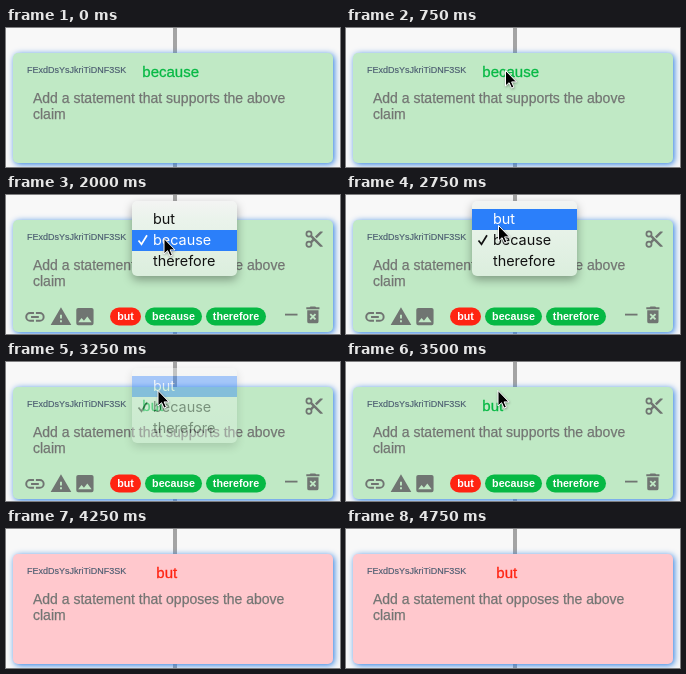
Write an HTML page that moves like this. It is 334x139 px and loops after 5.75 s.

```html
<!DOCTYPE html>
<html lang="en">
<head>
<meta charset="utf-8">
<title>Claim card</title>
<style>
  html, body { margin: 0; width: 100%; height: 100%; overflow: hidden; background: #f8f8f8; }
  svg { display: block; width: 334px; height: 139px; }
  text { font-family: "Liberation Sans", Arial, sans-serif; white-space: pre; }
  #menu text { font: 14.4px Inter, "Open Sans", sans-serif; }
  .pill text { font-size: 10.7px; font-weight: bold; fill: #fff; text-anchor: middle; }
  .body { font-size: 14px; fill: #737573; stroke: #737573; stroke-width: .25; }
  #label { font-size: 15px; stroke-width: .3; }
  #icons, #cut { fill: #707572; stroke: none; }
  .line { fill: none; stroke: #707572; stroke-width: 2; }
  filter { color-interpolation-filters: sRGB; }
</style>
</head>
<body>
<svg viewBox="0 0 334 139">
  <defs>
    <filter id="glow" x="-10%" y="-20%" width="120%" height="140%">
      <feDropShadow dx="1.3" dy="1.3" stdDeviation="3.1" flood-color="#2a7de1"/>
    </filter>
    <filter id="menuShade" x="-30%" y="-30%" width="160%" height="170%">
      <feDropShadow dx="0" dy="4" stdDeviation="5" flood-color="#000" flood-opacity="0.33"/>
    </filter>
    <filter id="tipShade" x="-40%" y="-30%" width="190%" height="170%">
      <feDropShadow dx="0.5" dy="1" stdDeviation="0.8" flood-color="#000" flood-opacity="0.35"/>
    </filter>
    <linearGradient id="paper" x1="0" y1="0" x2="0" y2="1">
      <stop offset="0" stop-color="#f3f4f3"/>
      <stop offset="0.25" stop-color="#eaf3eb"/>
      <stop offset="1" stop-color="#dbeedd"/>
    </linearGradient>
  </defs>

  <rect width="334" height="139" fill="#f8f8f8"/>
  <rect x="167" width="4" height="139" fill="#a4a4a4"/>
  <rect id="card" x="7" y="25" width="320" height="110" rx="5" filter="url(#glow)"/>

  <text x="21" y="45" font-size="9" fill="#4b5c70" stroke="#4b5c70" stroke-width=".15">FExdDsYsJkriTiDNF3SK</text>
  <text id="label" y="49"></text>
  <text id="line1" class="body" x="27" y="75"></text>
  <text class="body" x="27" y="91">claim</text>

  <g id="tools">
    <g id="cut" transform="translate(297.8 33.8) scale(.86)">
      <circle class="line" cx="6" cy="6" r="3"/>
      <circle class="line" cx="6" cy="18" r="3"/>
      <path d="M7.6 9.6L9.6 7.6L22 20V21H19ZM7.6 14.4L10 12L12 14L9.6 16.4ZM13 9L19 3H22V4L15 11Z"/>
    </g>
    <g id="icons">
      <path class="line" transform="translate(17.3 110.3) scale(.97)"
        d="M11 8H7a4 4 0 0 0 0 8h4M13 8h4a4 4 0 0 1 0 8h-4M8 12h8"/>
      <path transform="translate(43.7 110.3) scale(.94)" fill-rule="evenodd"
        d="M1 21H23L12 2ZM11 16h2v2h-2ZM11 10h2v4h-2Z"/>
      <path transform="translate(67.4 110) scale(.96)" fill-rule="evenodd"
        d="M5 3H19a2 2 0 0 1 2 2V19a2 2 0 0 1-2 2H5a2 2 0 0 1-2-2V5a2 2 0 0 1 2-2ZM8.5 13.5L5 18H19L14.5 12L11 16.5Z"/>
      <rect x="279" y="118.7" width="12.5" height="1.8"/>
      <g transform="translate(295.6 108.6) scale(.94)">
        <path d="M6 7H18V19a2 2 0 0 1-2 2H8a2 2 0 0 1-2-2ZM5 4H8.5l1-1h5l1 1H19V6H5Z"/>
        <path id="cross" d="M9.2 11.2l5.6 5.6M14.8 11.2l-5.6 5.6" stroke-width="2"/>
      </g>
    </g>
    <g id="pills"></g>
  </g>

  <g id="menu">
    <rect x="126" y="6" width="105" height="75" rx="5" fill="url(#paper)" filter="url(#menuShade)"/>
    <rect id="bar" x="126" width="105" height="21" fill="#2b7ffa"/>
    <path id="tick" d="M132.5 45.5l3 3.8l5.5-9" fill="none" stroke-width="1.7"/>
    <g id="rows"></g>
  </g>

  <path id="tip" d="M0 0V15.5L3.6 12.2L6 17.6L8.4 16.6L6.1 11.4H11Z"
    fill="#000" stroke="#fff" stroke-width="1" filter="url(#tipShade)"/>
</svg>

<script>
const LOOP = 5750;
const GREEN = "#06b944", RED = "#ff2412";
const MINT = "#c0e9c5", PINK = "#ffc8cd";
const words = ["but", "because", "therefore"];
const $ = id => document.getElementById(id);

function add(parent, tag, attrs, text) {
  const el = document.createElementNS("http://www.w3.org/2000/svg", tag);
  for (const k in attrs) el.setAttribute(k, attrs[k]);
  if (text) el.textContent = text;
  return parent.appendChild(el);
}

const set = (id, attrs) => {
  for (const k in attrs) $(id).setAttribute(k, attrs[k]);
};
const show = (id, on) => set(id, { visibility: on ? "visible" : "hidden" });

const pills = [[104, 31], [139, 57], [200, 60]].map(([x, w], i) => {
  const g = add($("pills"), "g", { class: "pill" });
  const box = add(g, "rect", { x, y: 112.5, width: w, height: 18, rx: 9 });
  add(g, "text", { x: x + w / 2, y: 125 }, words[i]);
  return box;
});
const rows = words.map((w, i) => add($("rows"), "text", { x: 147, y: 29 + 21 * i }, w));

// Pointer stops: time and tip position
const stops = [
  [750, 159.5, 42.5], [1000, 158, 43.5], [2750, 152.5, 30.5], [3000, 152, 28.5]
];

function draw(t) {
  const chosen = t >= 3250;
  const opposed = t >= 3750;
  const open = t >= 2000 && t < 4250;
  const fill = opposed ? PINK : MINT;
  const ink = opposed ? RED : GREEN;

  set("card", { fill, height: open ? 112 : 110 });
  set("cross", { stroke: fill });
  set("label", { x: opposed ? 150.3 : 136.3, fill: ink, stroke: ink });
  $("label").textContent = chosen ? "but" : "because";
  $("line1").textContent =
    `Add a statement that ${opposed ? "opposes" : "supports"} the above`;

  show("tools", open);
  pills.forEach((p, i) => p.setAttribute("fill", (i === 0) !== opposed ? RED : GREEN));

  // The menu dims for one step before it is gone
  show("menu", t >= 2000 && t < 3500);
  set("menu", { opacity: chosen ? 0.4 : 1 });
  const active = t < 2750 ? 1 : 0;
  set("bar", { y: 14 + 21 * active });
  set("tick", { stroke: active === 1 ? "#fff" : "#111" });
  rows.forEach((r, i) => r.setAttribute("fill", i === active ? "#fff" : "#111"));

  const stop = stops.filter(s => s[0] <= t).pop();
  show("tip", stop && t < 4250);
  if (stop) set("tip", { transform: `translate(${stop[1]} ${stop[2]})` });
}

const start = performance.now();
function tick(now) {
  draw(Math.max(0, now - start) % LOOP);
  requestAnimationFrame(tick);
}
draw(0);
requestAnimationFrame(tick);
</script>
</body>
</html>
```
